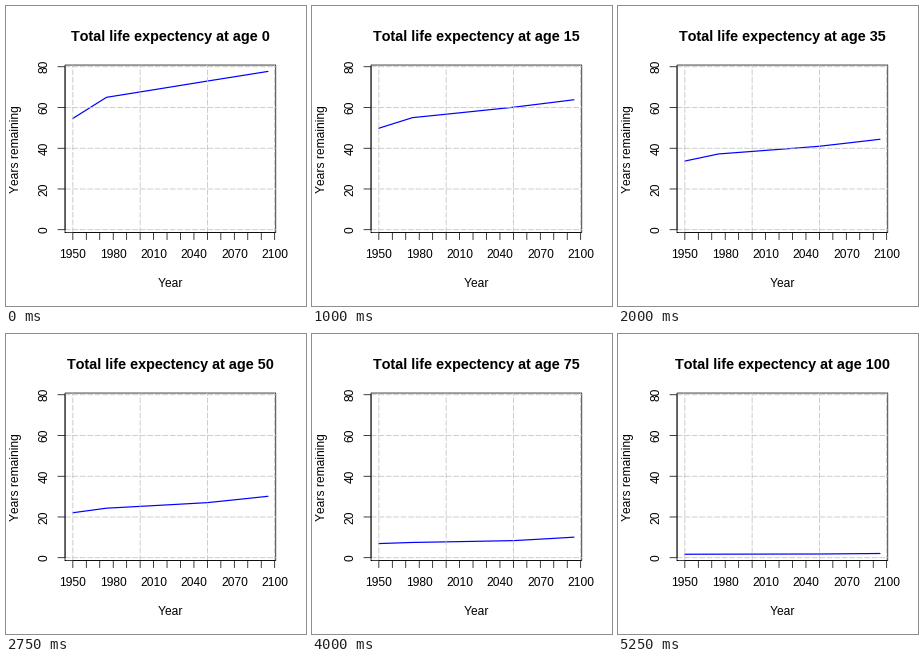
Write a matplotlib script that moves like this. It is 300x300 px and loops after 5500 ms.

```python
import numpy as np
import matplotlib.pyplot as plt
from matplotlib.animation import FuncAnimation

plt.rcParams.update({
    "font.family": "Liberation Sans",
    "font.size": 12,
    "text.hinting": "force_autohint",
    "text.hinting_factor": 8,
    "text.kerning_factor": 6,  # practically no kerning
    "path.snap": False,
    "lines.linewidth": 0.75,
    "lines.solid_capstyle": "round",
    "lines.dash_capstyle": "round",
})

SIZE = 300
LINE = 14.4  # height of one margin line
LEFT, RIGHT = 4.1 * LINE, SIZE - 2.1 * LINE
TOP, BOTTOM = 4.1 * LINE, SIZE - 5.1 * LINE
MID_X, MID_Y = (LEFT + RIGHT) / 2, (TOP + BOTTOM) / 2
TICK = LINE / 2

AGES = [0, 1, *range(5, 101, 5)]
YEARS = np.arange(1950, 2096, 5)


def padded(low, high):
    pad = 0.04 * (high - low)
    return low - pad, high + pad


X_RANGE = padded(1950, 2095)
Y_RANGE = padded(1.65, 77.8)


def to_x(year):
    return LEFT + (year - X_RANGE[0]) / (X_RANGE[1] - X_RANGE[0]) * (RIGHT - LEFT)


def to_y(value):
    return BOTTOM - (value - Y_RANGE[0]) / (Y_RANGE[1] - Y_RANGE[0]) * (BOTTOM - TOP)


def trend(*levels):
    return np.interp(YEARS, [1950, 1975, 2050, 2095], levels)


SLOPE = trend(0.815, 0.90, 0.965, 0.975)   # years lost per year of age
LIFESPAN = trend(75.0, 75.1, 76.35, 79.5)  # age where the decline levels off
SPREAD = trend(10.7, 10.5, 10.2, 10.0)     # softness of that bend
INFANT_LOSS = trend(7.4, 3.5, 1.6, 0.7)
FLOOR = 0.9


def remaining(age):
    decline = SLOPE * SPREAD * np.log1p(np.exp((LIFESPAN - age) / SPREAD))
    return FLOOR + decline - INFANT_LOSS * np.exp(-age)


fig = plt.figure(figsize=(SIZE / 72, SIZE / 72), dpi=72, facecolor="white")
ax = fig.add_axes([0, 0, 1, 1])
ax.set(xlim=(0, SIZE), ylim=(SIZE, 0))
ax.axis("off")


def stroke(xs, ys, color="black", **style):
    return ax.plot(xs, ys, color=color, **style)[0]


def label(x, y, text, **style):
    return ax.text(x, y, text, ha="center", va="baseline",
                   rotation_mode="anchor", **style)


curve = stroke([], [], "blue", linewidth=1.2)
stroke([LEFT, RIGHT, RIGHT, LEFT, LEFT], [BOTTOM, BOTTOM, TOP, TOP, BOTTOM])

GRID = dict(color="#bebebe", linestyle=(0, (7, 3)))
for year in range(1950, 2101, 50):
    stroke([to_x(year)] * 2, [BOTTOM, TOP], **GRID)
for value in range(0, 81, 20):
    stroke([LEFT, RIGHT], [to_y(value)] * 2, **GRID)

stroke([to_x(1950), to_x(2100)], [BOTTOM] * 2)
for year in range(1950, 2101, 10):
    stroke([to_x(year)] * 2, [BOTTOM, BOTTOM + TICK])
for year in range(1950, 2101, 30):
    label(to_x(year), BOTTOM + 1.8 * LINE, str(year))

stroke([LEFT] * 2, [to_y(0), to_y(80)])
for value in range(0, 81, 20):
    stroke([LEFT, LEFT - TICK], [to_y(value)] * 2)
    label(LEFT - 1.2 * LINE, to_y(value), str(value), rotation=90)

label(MID_X, BOTTOM + 3.8 * LINE, "Year")
label(LEFT - 3.2 * LINE, MID_Y, "Years remaining", rotation=90)
title = label(MID_X, 34.8, "", fontsize=14.4, fontweight="bold")


def draw(index):
    age = AGES[index]
    curve.set_data(to_x(YEARS), to_y(remaining(age)))
    title.set_text(f"Total life expectency at age {age}")
    return curve, title


animation = FuncAnimation(fig, draw, frames=len(AGES), interval=250,
                          repeat=True, repeat_delay=0)
plt.show()
```
